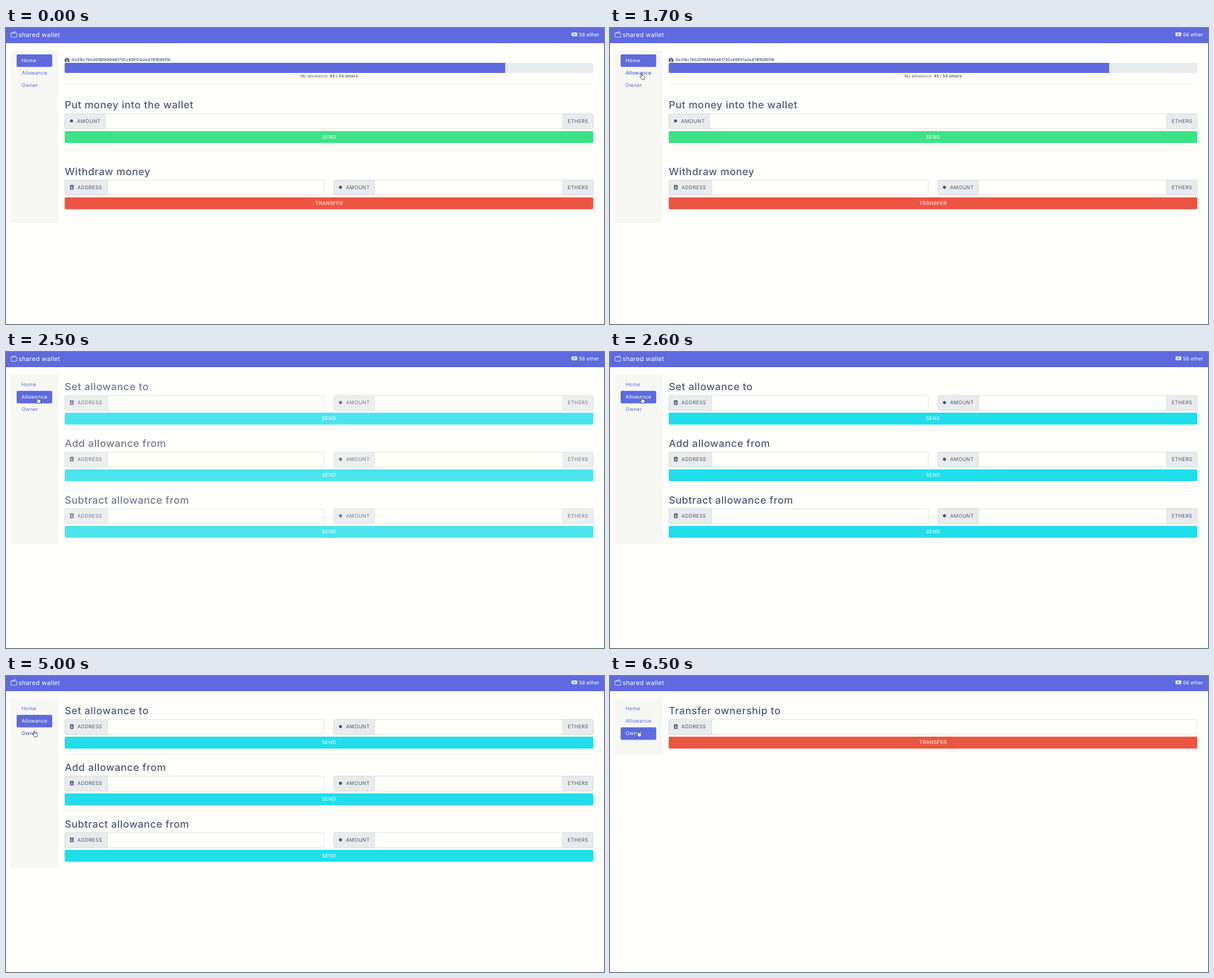
An HTML page that plays this animation: 1063x527 px, repeating every 8 s.

```html
<!DOCTYPE html>
<html lang="en">
<head>
<meta charset="utf-8">
<title>shared wallet</title>
<style>
  :root { --brand: #5e6add; --hover: #3440bd; --ink: #4f587c; --paper: #fffffb; --gray: #e9ecec; }
  html, body { margin: 0; width: 100%; height: 100%; overflow: hidden; background: var(--paper); }
  svg { display: block; width: 1063px; height: 527px; }
  text {
    font: 400 8.9px Inter, "Open Sans", sans-serif;
    letter-spacing: .03em;
    text-rendering: geometricPrecision;
    fill: var(--ink);
  }
  .brand { font-size: 11.1px; fill: #fff; }
  .balance { letter-spacing: .015em; text-anchor: end; fill: #fff; }
  .title { font-size: 17.8px; font-weight: 500; letter-spacing: .034em; }
  .label { letter-spacing: .04em; }
  .action { letter-spacing: .04em; text-anchor: middle; fill: #fff; }
  .small { font-size: 7.1px; letter-spacing: .02em; }
  .bold { font-weight: 600; }
  .box { fill: var(--paper); stroke: #ced4da; stroke-width: .65; }
  .tag { fill: var(--gray); stroke: #ced4da; stroke-width: .65; }
  .rule { stroke: #e6e6e3; stroke-width: .7; }
  .ink { fill: var(--ink); }
  .link { fill: var(--brand); }

  .anim { animation: 8s step-end infinite; }
  #home { animation-name: home; }
  #allowance { animation-name: allowance; }
  #owner { animation-name: owner; }
  #side { animation-name: side; }
  #pill { animation-name: pill; }
  #linkHome { animation-name: link-home; }
  #linkAllow { animation-name: link-allow; }
  #linkOwner { animation-name: link-owner; }
  #cursor { animation-name: move; }
  #arrow { animation-name: arrow; }
  #hand { animation-name: hand; }

  @keyframes home { 0% { opacity: 1 } 30%, 100% { opacity: 0 } }
  @keyframes allowance {
    0% { opacity: 0 } 30% { opacity: .12 } 31.25% { opacity: .8 }
    32.5% { opacity: 1 } 76.25%, 100% { opacity: 0 }
  }
  @keyframes owner {
    0% { opacity: 0 } 76.25% { opacity: .12 } 77.5% { opacity: .95 } 81.25%, 100% { opacity: 1 }
  }
  @keyframes side { 0% { height: 307px } 30% { height: 302px } 76.25%, 100% { height: 100px } }
  @keyframes pill {
    0% { transform: none } 30% { transform: translateY(22.2px) }
    76.25%, 100% { transform: translateY(44.4px) }
  }
  @keyframes link-home { 0% { fill: #fff } 30%, 100% { fill: var(--brand) } }
  @keyframes link-allow {
    0% { fill: var(--brand) } 10% { fill: var(--hover) } 30% { fill: #fff }
    76.25%, 100% { fill: var(--brand) }
  }
  @keyframes link-owner {
    0% { fill: var(--brand) } 60% { fill: var(--hover) } 76.25%, 100% { fill: #fff }
  }
  @keyframes arrow { 0% { opacity: 0 } 2.5% { opacity: 1 } 10%, 100% { opacity: 0 } }
  @keyframes hand { 0% { opacity: 0 } 10%, 100% { opacity: 1 } }
  @keyframes move {
    0% { transform: translate(81.5px, 15.5px) }
    3.75% { transform: translate(99px, 40px) }
    5% { transform: translate(114.5px, 62px) }
    7.5% { transform: translate(107px, 66px) }
    8.75% { transform: translate(90px, 72px) }
    10% { transform: translate(71px, 78px) }
    11.25% { transform: translate(61px, 79.3px) }
    12.5% { transform: translate(57px, 79.5px) }
    18.75% { transform: translate(56px, 79.5px) }
    20% { transform: translate(54px, 80px) }
    21.25% { transform: translate(52.6px, 80.2px) }
    51.25% { transform: translate(52.6px, 80.2px); animation-timing-function: steps(9, end) }
    62.5%, 100% { transform: translate(46.6px, 97.2px) }
  }
</style>
</head>
<body>
<svg viewBox="0 0 1063 527">
  <defs>
    <rect id="btn" x="104.3" y="31" width="939.7" height="21.2" rx="2.2"/>
    <rect id="wide" class="box" x="104.5" y=".4" width="939.3" height="26.4" rx="2.2"/>
    <g id="address">
      <path class="tag" d="M181 .4H106.7a2.2 2.2 0 0 0-2.2 2.2V24.6a2.2 2.2 0 0 0 2.2 2.2H181z"/>
      <rect class="ink" x="113.8" y="8.8" width="6.4" height="8.4" rx=".8"/>
      <circle cx="117" cy="11.9" r="1.15" fill="#e9ecec"/>
      <path d="M114.9 15.4q.2-1.7 2.1-1.7t2.1 1.7z" fill="#e9ecec"/>
      <text class="label" x="127" y="16.3">ADDRESS</text>
    </g>
    <g id="amount">
      <path class="tag" d="M177 .4H106.7a2.2 2.2 0 0 0-2.2 2.2V24.6a2.2 2.2 0 0 0 2.2 2.2H177z"/>
      <circle class="ink" cx="116.4" cy="13" r="2.8"/>
      <text class="label" x="126.2" y="16.3">AMOUNT</text>
    </g>
    <g id="ethers">
      <path class="tag" d="M989.4 .4h52.2a2.2 2.2 0 0 1 2.2 2.2V24.6a2.2 2.2 0 0 1-2.2 2.2h-52.2z"/>
      <text class="label" x="998.6" y="16.3">ETHERS</text>
    </g>
    <g id="pair">
      <rect class="box" x="104.5" y=".4" width="461.2" height="26.4" rx="2.2"/>
      <rect class="box" x="582.9" y=".4" width="460.9" height="26.4" rx="2.2"/>
      <use href="#address"/>
      <use href="#amount" x="478.2"/>
      <use href="#ethers"/>
    </g>
    <g id="grant">
      <use href="#pair"/>
      <use href="#btn" fill="#20deea"/>
      <text class="action" x="574.3" y="44.4">SEND</text>
    </g>
  </defs>

  <rect width="1063" height="527" fill="#fffffb"/>

  <!-- top bar -->
  <rect width="1063" height="27" fill="#5e6add"/>
  <g fill="none" stroke="#fff" stroke-width=".8" stroke-linejoin="round">
    <rect x="8.7" y="9" width="10.4" height="7.4" rx="1"/>
    <path d="M9.4 9L16 6.7q1.2-.3 1.4.8V9"/>
  </g>
  <text class="brand" x="22.2" y="15.9">shared wallet</text>
  <rect x="1005.4" y="8" width="10" height="6.6" rx=".6" fill="#fff"/>
  <ellipse cx="1010.4" cy="11.3" rx="1.7" ry="2" fill="#5e6add"/>
  <path d="M1010.5 10.1v2.4" stroke="#fff" stroke-width=".6"/>
  <path d="M1006.2 10.2V8.9h1.3M1013.3 8.9h1.3v1.3M1014.6 12.4v1.3h-1.3M1007.5 13.7h-1.3v-1.3" fill="none" stroke="#5e6add" stroke-width=".5"/>
  <text class="balance" x="1054.6" y="14.6">58 ether</text>

  <!-- sidebar -->
  <rect id="side" class="anim" x="8" y="40.2" width="85" height="307" fill="#f7f7f4"/>
  <rect id="pill" class="anim" x="18.9" y="47" width="63.2" height="22.2" rx="2.2" fill="#5e6add"/>
  <text id="linkHome" class="anim link" x="27.7" y="61.1">Home</text>
  <text id="linkAllow" class="anim link" x="27.7" y="83.2">Allowance</text>
  <text id="linkOwner" class="anim link" x="27.7" y="105.4">Owner</text>

  <g id="home" class="anim">
    <path class="ink" d="M105 54.4h2.2V53h2.6v1.4h2.2q.6 0 .6.6v5q0 .6-.6.6h-7q-.6 0-.6-.6v-5q0-.6.6-.6z"/>
    <circle cx="108.5" cy="56.8" r="1" fill="#fffffb"/>
    <path d="M106.6 59.8q.2-1.5 1.9-1.5t1.9 1.5z" fill="#fffffb"/>
    <text class="small bold" x="116.8" y="59.3" style="letter-spacing:0">0x31Ec7b52D18fA9046173CcE0F51a2e47B1D95f16</text>
    <rect x="104.3" y="62" width="939.7" height="18" rx="2.2" fill="#e9ecec"/>
    <path d="M887.4 62H106.5a2.2 2.2 0 0 0-2.2 2.2V77.8a2.2 2.2 0 0 0 2.2 2.2H887.4z" fill="#5e6add"/>
    <text class="small" x="574.3" y="87.7" text-anchor="middle">My allowance: <tspan class="bold">45 / 54 ethers</tspan></text>
    <path class="rule" d="M104.3 99.5H1044M104.3 218.4H1044"/>

    <text class="title" x="104.4" y="143.2">Put money into the wallet</text>
    <g transform="translate(0 152.5)">
      <use href="#wide"/>
      <use href="#amount"/>
      <use href="#ethers"/>
      <use href="#btn" fill="#3be387"/>
      <text class="action" x="574.3" y="44.4">SEND</text>
    </g>

    <text class="title" x="104.4" y="262">Withdraw money</text>
    <g transform="translate(0 270.6)">
      <use href="#pair"/>
      <use href="#btn" fill="#ec5541"/>
      <text class="action" x="574.3" y="44.4">TRANSFER</text>
    </g>
  </g>

  <g id="allowance" class="anim">
    <text class="title" x="104.4" y="68.3">Set allowance to</text>
    <use href="#grant" y="77.1"/>
    <path class="rule" d="M104.3 138.4H1044M104.3 239.2H1044"/>
    <text class="title" x="104.4" y="169">Add allowance from</text>
    <use href="#grant" y="177.9"/>
    <text class="title" x="104.4" y="269.8">Subtract allowance from</text>
    <use href="#grant" y="278.6"/>
  </g>

  <g id="owner" class="anim">
    <text class="title" x="104.4" y="68.3">Transfer ownership to</text>
    <g transform="translate(0 77.1)">
      <use href="#wide"/>
      <use href="#address"/>
      <use href="#btn" fill="#ec5541"/>
      <text class="action" x="574.3" y="44.4">TRANSFER</text>
    </g>
  </g>

  <g id="cursor" class="anim">
    <path id="arrow" class="anim" fill="#111" stroke="#fff" stroke-width=".7" d="M0 0V9.6L2.2 7.5L3.7 11L5.2 10.4L3.7 7H6.8z"/>
    <path id="hand" class="anim" fill="#fff" stroke="#1c1c28" stroke-width=".8" stroke-linejoin="round"
      d="M2.9 6.8V1.2a.9.9 0 0 1 1.8 0V4.4q.8-.5 1.6.2q.8-.4 1.5.3q1.2-.2 1.4.9v2.2q0 1-.8 2V11.2H3.9V10.2L1 7.4q-.6-1 .4-1.2q.7 0 1.5.9z"/>
  </g>
</svg>
</body>
</html>
```
